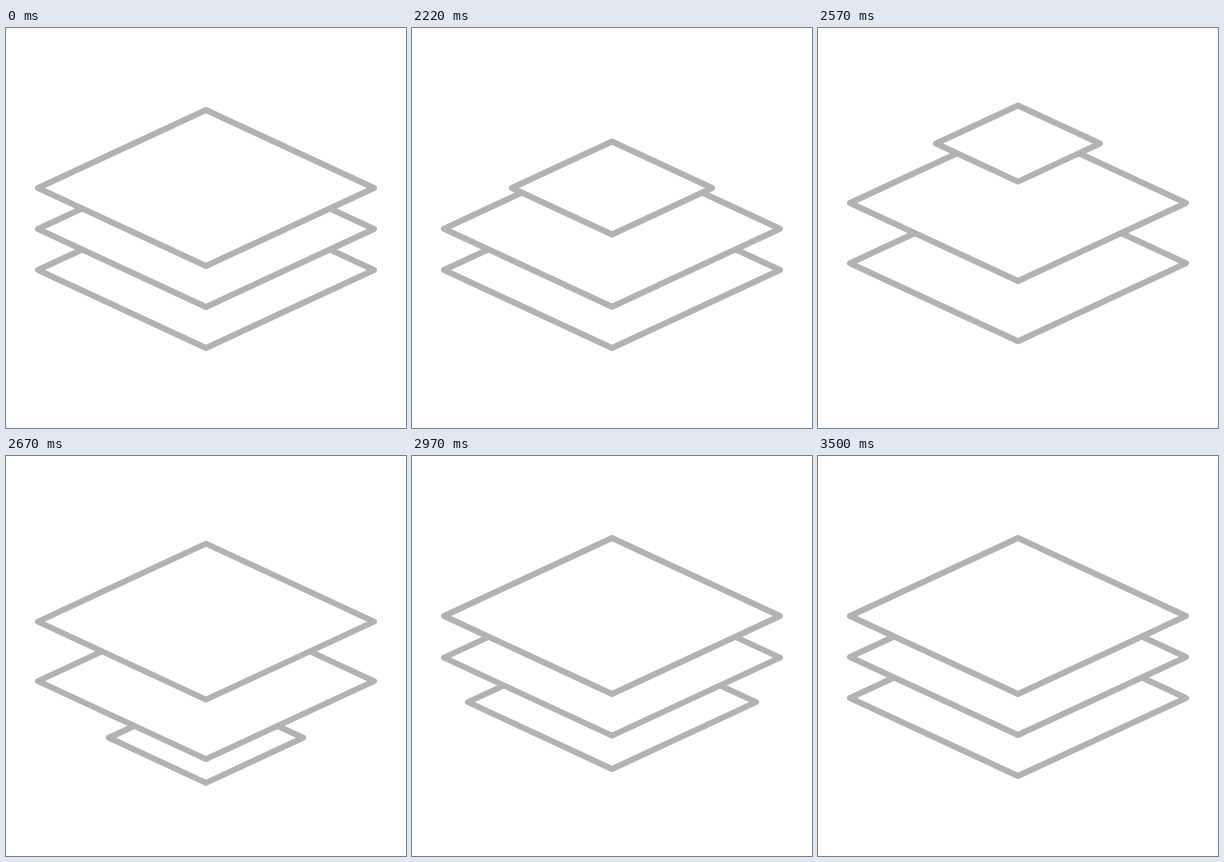
Animation, 400 px wide and 400 px high, one loop 3.52 s. Source, as an HTML page:

```html
<!DOCTYPE html>
<html lang="en">
<head>
<meta charset="utf-8">
<title>Layers</title>
<style>
  html, body { margin: 0; width: 100%; height: 100%; overflow: hidden; background: #fff; }
  svg { display: block; width: 100vw; height: 100vh; }
  polygon { fill: #fff; stroke: #b2b2b2; stroke-width: 6; stroke-linejoin: round; }
</style>
</head>
<body>
<svg viewBox="0 0 400 400">
  <polygon id="fresh"/>
  <polygon id="low"/>
  <polygon id="mid"/>
  <polygon id="lift"/>
</svg>
<script>
  const LOOP = 3520, SWAP = 2600, END = 3500;
  const TOP = 160, GAP = 41, HALF_W = 168, HALF_H = 78, SMALL = 0.488;

  const progress = (t, from, to) => Math.min(1, Math.max(0, (t - from) / (to - from)));
  const inOut = u => u < 0.5 ? 4 * u ** 3 : 1 - 4 * (1 - u) ** 3;

  function place(id, y, scale = 1, visible = true) {
    const el = document.getElementById(id);
    const w = HALF_W * scale, h = HALF_H * scale;
    el.setAttribute('points', `200,${y - h} ${200 + w},${y} 200,${y + h} ${200 - w},${y}`);
    el.style.display = visible ? '' : 'none';
  }

  function draw(t) {
    // The top sheet shrinks, then lifts off
    const shrink = inOut(progress(t, 2000, 2360));
    const rise = progress(t, 2184, SWAP) ** 3;
    place('lift', TOP - 53.5 * rise, 1 - (1 - SMALL) * shrink, t <= SWAP);

    // The other two move up one slot
    place('mid', TOP + GAP - GAP * inOut(progress(t, 2135, 2935)));
    place('low', TOP + 2 * GAP - GAP * inOut(progress(t, 2300, 3100)));

    // A new sheet comes in from below
    const left = 1 - progress(t, SWAP, END);
    place('fresh', TOP + 2 * GAP + 61.5 * left ** 5, 1 - 0.52 * left ** 2.4, t > SWAP);
  }

  // 40 steps per second, alternately 20 and 30 ms long
  const step = t => Math.floor(t / 50) * 50 + (t % 50 >= 20 ? 25 : 0);

  function tick() {
    draw(Math.min(END, step(performance.now() % LOOP)));
    requestAnimationFrame(tick);
  }
  tick();
</script>
</body>
</html>
```
